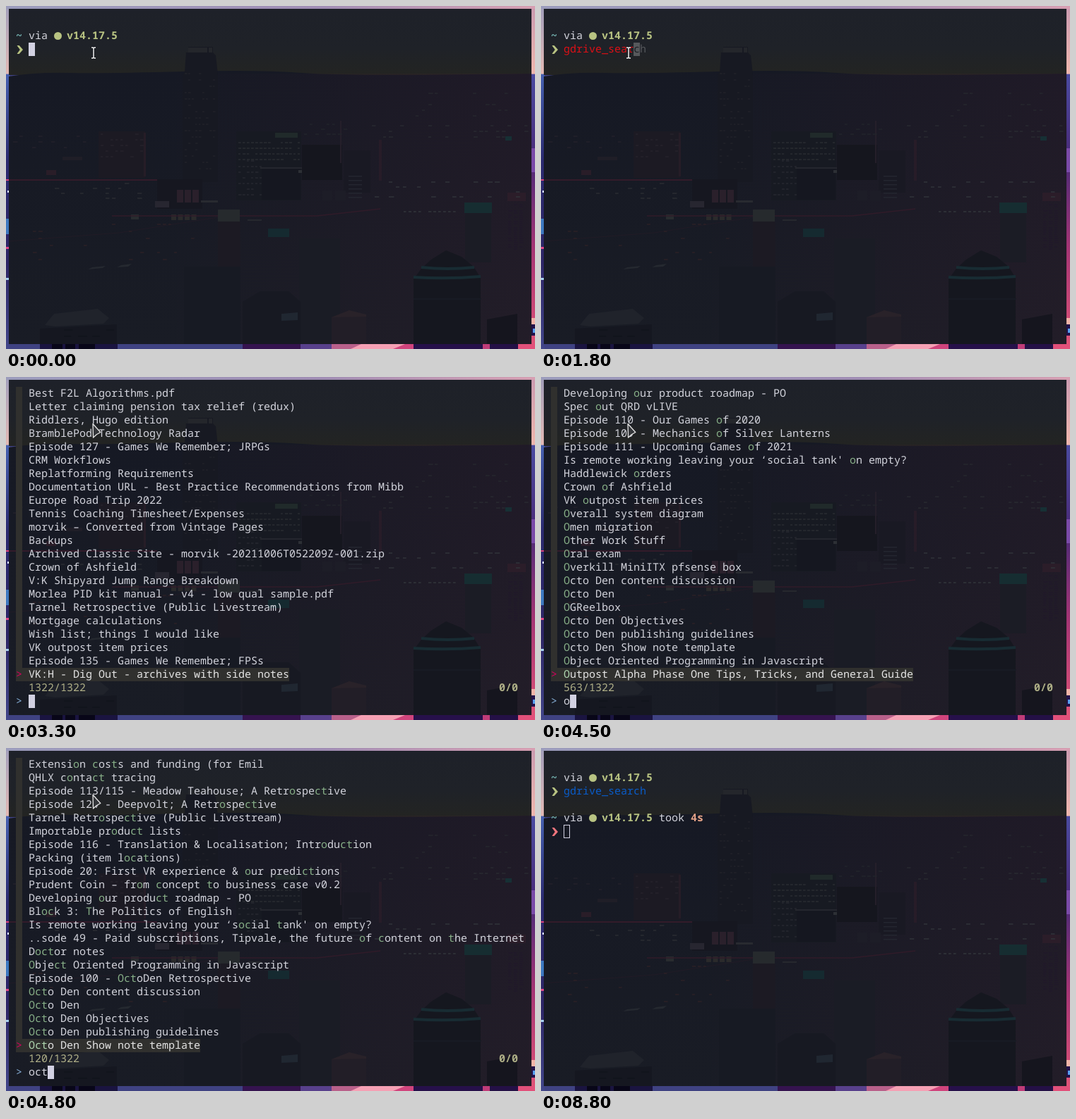
Write an HTML page that moves like this. It is 749x487 px and loops after 8900 ms.

```html
<!DOCTYPE html>
<html lang="en">
<head>
<meta charset="utf-8">
<title>Terminal search</title>
<style>
html, body { margin: 0; width: 100%; height: 100%; overflow: hidden; background: #191c25; }
svg { display: block; }
text { font: 15px "Noto Sans Mono", "DejaVu Sans Mono", monospace; white-space: pre; text-rendering: geometricPrecision; }
text.b { font-weight: 700; }
</style>
</head>
<body>
<svg width="749" height="487" viewBox="0 0 749 487">
  <defs>
    <linearGradient id="top"><stop offset="0" stop-color="#9b9cbc"/><stop offset=".6" stop-color="#a08db4"/><stop offset="1" stop-color="#d79fb2"/></linearGradient>
    <linearGradient id="left" x2="0" y2="1">
      <stop offset="0" stop-color="#a09dba"/><stop offset=".197" stop-color="#e3b9b4"/><stop offset=".2" stop-color="#4660b0"/>
      <stop offset=".45" stop-color="#2b2a70"/><stop offset=".75" stop-color="#2d2566"/><stop offset="1" stop-color="#42468a"/>
    </linearGradient>
    <linearGradient id="right" x2="0" y2="1">
      <stop offset="0" stop-color="#c99ab0"/><stop offset=".197" stop-color="#efb7ae"/><stop offset=".2" stop-color="#4a4aa0"/>
      <stop offset=".45" stop-color="#4a2a78"/><stop offset=".7" stop-color="#a33474"/><stop offset="1" stop-color="#e25578"/>
    </linearGradient>
    <linearGradient id="sky" x2="0" y2="1"><stop offset="0" stop-color="#1e2129"/><stop offset=".6" stop-color="#1f2228"/><stop offset="1" stop-color="#232422"/></linearGradient>
    <linearGradient id="land" x2="0" y2="1"><stop offset="0" stop-color="#161924"/><stop offset="1" stop-color="#191c25"/></linearGradient>
    <linearGradient id="glow"><stop offset=".3" stop-color="#a02850" stop-opacity="0"/><stop offset="1" stop-color="#a02850" stop-opacity=".07"/></linearGradient>
  </defs>
  <g id="city"></g>
  <g id="screen"></g>
</svg>
<script>
const $ = id => document.getElementById(id);
const rect = (x, y, w, h, fill) => `<rect x="${x}" y="${y}" width="${w}" height="${h}" fill="${fill}"/>`;
const shape = (d, fill) => `<path d="${d}" fill="${fill}"/>`;
const line = (d, color, w = 1) => `<path d="${d}" fill="none" stroke="${color}" stroke-width="${w}"/>`;

// ---- wallpaper and dimmed skyline ----
let seed = 7;
const rnd = () => (seed = (seed * 16807) % 2147483647) / 2147483647;

// lit windows on a loose grid
function lights(x, y, w, h, dx, dy, chance, color) {
  let d = '';
  for (let j = y; j < y + h; j += dy)
    for (let i = x; i < x + w; i += dx)
      if (rnd() < chance) d += `M${i} ${j}h${(dx * (.45 + rnd() * .3)).toFixed(1)}`;
  return line(d, color, 1.6);
}

function wallpaper() {
  return rect(0, 0, 749, 487, '#3f4282') + rect(0, 0, 5, 487, 'url(#left)') + rect(743, 0, 6, 487, 'url(#right)') +
    rect(0, 0, 749, 4, 'url(#top)') +
    rect(0, 246, 4, 2, '#d8407c') + rect(2, 262, 2, 3, '#dfe6ff') + rect(0, 302, 4, 22, '#3c78c0') +
    rect(0, 342, 4, 3, '#e0488a') + rect(0, 386, 4, 3, '#a8d0f0') +
    rect(743, 202, 6, 34, '#7a4aa8') + rect(743, 443, 6, 9, '#f2b4a8') + rect(743, 452, 6, 16, '#22124a') + rect(746, 458, 3, 6, '#58a0f0') +
    rect(48, 480, 110, 7, '#1a1440') + rect(65, 480, 15, 7, '#080618') + rect(84, 480, 14, 7, '#080618') + rect(103, 480, 23, 7, '#080618') +
    rect(335, 480, 82, 7, '#35134f') + rect(417, 480, 44, 7, '#58408c') + rect(461, 480, 50, 7, '#b9608a') +
    rect(511, 480, 66, 7, '#d0447c') + shape('M488 487L503 480H565L548 487Z', '#f5a0b4') +
    rect(577, 480, 98, 7, '#26104a') + rect(675, 480, 10, 7, '#c03c78') + rect(685, 480, 40, 7, '#241046') + rect(725, 480, 24, 7, '#e2507a');
}

function skyline() {
  let s = rect(4, 4, 740, 94, 'url(#sky)') +
    shape('M4 100Q40 94 90 95T250 93T420 95T744 96V480H4Z', 'url(#land)') + rect(4, 96, 740, 384, 'url(#glow)');
  // central tower
  s += shape('M250 250V98L253 94L255 66H258V58H293V66L297 70L300 98V250Z', '#171922') + rect(258, 59, 27, 7, '#24262b') + rect(287, 59, 5, 7, '#24262b') +
    lights(253, 96, 44, 140, 5, 9, .35, '#20222a');
  // mid-town blocks
  s += rect(131, 178, 66, 66, '#1c1a23') + lights(134, 182, 62, 36, 7, 8, .45, '#26232b') + rect(195, 180, 3, 62, '#261d27') +
    rect(326, 178, 92, 98, '#171a22') + lights(329, 194, 88, 26, 6, 8, .85, '#292c32') + lights(329, 220, 32, 54, 6, 8, .75, '#262930') +
    rect(381, 180, 32, 7, '#202a2a') + rect(362, 230, 55, 45, '#151720') + rect(360, 229, 72, 2, '#25272e') + rect(414, 233, 18, 4, '#2d3035') +
    rect(419, 197, 57, 50, '#15161e') + rect(473, 163, 2, 60, '#251f2a') + rect(478, 205, 38, 60, '#191923') + rect(528, 190, 4, 58, '#271c28');
  s += rect(214, 246, 64, 42, '#161720') + rect(276, 276, 24, 3, '#282a30') + rect(211, 277, 20, 9, '#272630') + rect(177, 296, 11, 7, '#282c2f');
  for (let i = 0; i < 3; i++) s += rect(242 + i * 11, 261, 9, 18, '#2a202b');
  for (let i = 0; i < 4; i++) s += rect(234 + i * 9.5, 296, 7, 8, '#2a2a2b');
  for (let i = 0; i < 6; i++) s += rect(485, 241 + i * 6, 19, 1.5, '#242630');
  s += rect(448, 262, 14, 14, '#1d1d27') + rect(466, 262, 15, 14, '#1d1d27') + rect(57, 233, 14, 7, '#291d28') + rect(80, 214, 28, 5, '#1f1e27');
  // streets
  s += line('M4 247H214', '#3c1b2d', 1.6) + line('M150 298H440L530 288', '#301b29', 1.4) + line('M4 334L160 322L300 300', '#211b26');
  // signs
  s += rect(300, 306, 32, 70, '#1c1a23') + rect(300, 289, 31, 17, '#262a2d') + rect(342, 303, 20, 2, '#26282e') +
    rect(371, 316, 30, 12, '#152a30') + rect(649, 279, 39, 15, '#162d31') + rect(650, 294, 37, 70, '#1b1c25') + rect(707, 185, 9, 6, '#173035') +
    rect(710, 265, 26, 12, '#2b1d29') + lights(711, 282, 24, 64, 8, 3, .8, '#21192a');
  // scattered street lights
  s += lights(510, 170, 230, 24, 8, 8, .25, '#292a31') + lights(512, 250, 226, 26, 10, 7, .18, '#30333a') + lights(563, 292, 74, 1, 7, 5, .95, '#32363b') +
    lights(580, 124, 155, 34, 9, 8, .12, '#26272e') + lights(422, 168, 60, 24, 8, 7, .25, '#22242b') +
    lights(10, 185, 100, 24, 9, 8, .15, '#23222b') + lights(60, 252, 130, 24, 9, 7, .2, '#2a2c32') +
    lights(30, 310, 240, 54, 8, 10, .12, '#2b2026') + shape('M116 374L122 371L141 369L137 372Z', '#252930') + shape('M157 371L163 368L178 366L173 370Z', '#252930');
  // foreground
  s += rect(252, 370, 80, 110, '#171a23') + rect(415, 330, 58, 150, '#1a1c25') + shape('M335 480V420L360 405H400L417 420V480Z', '#171922') + shape('M390 437L413 435V446L390 447Z', '#202731') +
    shape('M461 442L486 432L510 440V480H461Z', '#221e27') + shape('M461 442L486 432L510 438V441Z', '#292229');
  s += shape('M48 480V458L157 452V480Z', '#151720') + shape('M55 453L68 437L130 430L146 443L138 451L70 455Z', '#20232b') +
    lights(62, 460, 90, 18, 20, 9, .7, '#11131b');
  s += shape('M577 480V388L588 373L602 360L623 347L645 356L662 370L672 386V480Z', '#15171f') +
    line('M588 371Q625 375 663 371', '#182c33', 4) + line('M577 385Q625 388 672 384', '#182c33', 4) +
    rect(577, 415, 96, 2, '#181b24') + shape('M681 480V445L724 437V480Z', '#15151e');
  return s;
}
$('city').innerHTML = wallpaper() + skyline();

// ---- terminal grid: 9 x 19 px cells ----
const X = c => 14 + 9 * c, Y = r => 14 + 19 * r;
const FG = '#d3d4dc', OLIVE = '#b8c382', CORAL = '#ee747c', MATCH = '#87af87', BAR = '#30302e';
const text = (c, r, s, fill = FG, bold) =>
  `<text x="${X(c)}" y="${Y(r) + 14}" fill="${fill}"${bold ? ' class="b"' : ''}>${s.replace(/&/g, '&amp;')}</text>`;
const block = (c, r, fill = '#d2d1e2') => rect(X(c), Y(r), 9, 19, fill);

const beam = (x, y) => `<g transform="translate(${x} ${y})">` +
  ['#16181f:3.6', '#f4f4f4:1.5'].map(p => line('M-3 -7.5H-1L0 -6.5L1 -7.5H3M0 -6.5V6.5M-3 7.5H-1L0 6.5L1 7.5H3', ...p.split(':'))).join('') + '</g>';
const arrow = '<path d="M123 66.5L133.8 78.5L128.5 81.5L123.5 86Z" fill="#34363a" stroke="#e4e4e4" stroke-width="1.3" stroke-linejoin="round"/>';

const prompt = (r, color) =>
  text(0, r, '~', '#7cc0bd', 1) + text(2, r, 'via') + `<circle cx="73.5" cy="${Y(r) + 9.5}" r="5.5" fill="${OLIVE}"/>` +
  text(8, r, 'v14.17.5', OLIVE, 1) + `<path d="M15.5 ${Y(r) + 23}h3.2l5.3 6-5.3 6h-3.2l4.3-6z" fill="${color}"/>`;

const CMD = 'gdrive_search';
function typed(n) {
  const done = n === CMD.length, hint = n > 0 && !done;
  return prompt(1, OLIVE) + text(2, 2, CMD.slice(0, n), done ? '#0a5cc8' : '#dd1016') +
    block(2 + n, 2, hint ? '#56585b' : undefined) +
    (hint ? text(2 + n, 2, CMD[n], '#1d2026') + text(3 + n, 2, CMD.slice(n + 1), '#54565a') : '') + beam(124, 66.5);
}

function finished(pointer, focused = true) {
  return prompt(1, OLIVE) + text(2, 2, CMD, '#0a5cc8') + prompt(4, CORAL) + text(17, 4, 'took') + text(22, 4, '4s', '#e5a387', 1) +
    (focused ? block(2, 5) : '<rect x="32.5" y="109.5" width="8" height="18" fill="none" stroke="#d2d1e2"/>') + pointer;
}

// "_" marks the next character as matched
const mark = (s, color) => s.replace(/_(.)/g, `<tspan fill="${color}">$1</tspan>`);
function finder(query, count, rows) {
  const last = rows.length - 1;
  let s = '';
  if (rows.length) {
    s += rect(14, 14, 9, 418, BAR) + rect(14, Y(last), 9 * (2 + rows[last].replace(/_/g, '').length), 19, BAR) + text(0, last, '&gt;'.replace('&gt;', '>'), '#d7005f');
    rows.forEach((row, i) => s += text(2, i, mark(row, i === last ? '#afd7af' : MATCH), i === last ? '#e4e4e4' : FG));
  }
  return s + text(2, 22, count, '#afaf87') + text(76, 22, '0/0', '#afaf87', 1) +
    text(0, 23, '>', '#87afd7') + text(2, 23, query) + block(2 + query.length, 23) + arrow;
}

const recent = `Best F2L Algorithms.pdf
Letter claiming pension tax relief (redux)
Riddlers, Hugo edition
BramblePod Technology Radar
Episode 127 - Games We Remember; JRPGs
CRM Workflows
Replatforming Requirements
Documentation URL - Best Practice Recommendations from Mibb
Europe Road Trip 2022
Tennis Coaching Timesheet/Expenses
morvik – Converted from Vintage Pages
Backups
Archived Classic Site - morvik -20211006T052209Z-001.zip
Crown of Ashfield
V:K Shipyard Jump Range Breakdown
Morlea PID kit manual - v4 - low qual sample.pdf
Tarnel Retrospective (Public Livestream)
Mortgage calculations
Wish list; things I would like
VK outpost item prices
Episode 135 - Games We Remember; FPSs
VK:H - Dig Out - archives with side notes`.split('\n');

const matchO = `Developing _our product roadmap - PO
Spec _out QRD vLIVE
Episode 110 - Our Games _of 2020
Episode 109 - Mechanics _of Silver Lanterns
Episode 111 - Upcoming Games _of 2021
Is remote working leaving your ‘social tank' _on empty?
Haddlewick _orders
Crown _of Ashfield
VK _outpost item prices
_Overall system diagram
_Omen migration
_Other Work Stuff
_Oral exam
_Overkill MiniITX pfsense box
_Octo Den content discussion
_Octo Den
_OGReelbox
_Octo Den Objectives
_Octo Den publishing guidelines
_Octo Den Show note template
_Object Oriented Programming in Javascript
_Outpost Alpha Phase One Tips, Tricks, and General Guide`.split('\n');

const matchOct = `Extensi_on _cos_ts and funding (for Emil
QHLX c_onta_c_t tracing
Episode 113/115 - Meadow Teahouse; A Retr_ospe_c_tive
Episode 124 - Deepvolt; A Retr_ospe_c_tive
Tarnel Retr_ospe_c_tive (Public Livestream)
Importable pr_odu_c_t lists
Episode 116 - Translation & Localisation; Intr_odu_c_tion
Packing (item l_o_ca_tions)
Episode 20: First VR experience & _our predi_c_tions
Prudent Coin – fr_om _concept _to business case v0.2
Developing _our produ_c_t roadmap - PO
Bl_o_ck 3: _The Politics of English
Is remote working leaving your ‘s_o_cial _tank' on empty?
..sode 49 - Paid subscriptions, Tipvale, the future _of _content on _the Internet
D_o_c_tor notes
_Obje_c_t Oriented Programming in Javascript
Episode 100 - _O_c_toDen Retrospective
_O_c_to Den content discussion
_O_c_to Den
_O_c_to Den Objectives
_O_c_to Den publishing guidelines
_O_c_to Den Show note template`.split('\n');
const matchOc = matchOct.map(s => s.replace(/_([tT])/g, '$1'));

// ---- timeline ----
const LOOP = 8900;
const keys = [[0, 0], [800, 1], [900, 2], [1000, 3], [1100, 4], [1200, 5], [1300, 6], [1400, 7],
  [1600, 8], [1700, 10], [1800, 11], [2000, 12], [2100, 13]];
const steps = [
  ...keys.map(([t, n]) => [t, typed(n)]),
  [3200, finder('', '0/0', [])],
  [3300, finder('', '1322/1322', recent)],
  [4500, finder('o', '563/1322', matchO)],
  [4600, finder('oc', '297/1322', matchOc)],
  [4800, finder('oct', '120/1322', matchOct)],
  [7200, finished(beam(124, 66.5))],
  [8200, finished(beam(119, 59))],
  [8300, finished(beam(105, 43))],
  [8400, finished(beam(86, 26))],
  [8500, finished(beam(66, 9))],
  [8600, finished('')],
  [8800, finished('', false)]
];

const start = performance.now();
let shown = -1;
function draw() {
  const t = (performance.now() - start) % LOOP;
  let i = steps.length - 1;
  while (steps[i][0] > t) i--;
  if (i !== shown) $('screen').innerHTML = steps[shown = i][1];
  requestAnimationFrame(draw);
}
draw();
</script>
</body>
</html>
```
